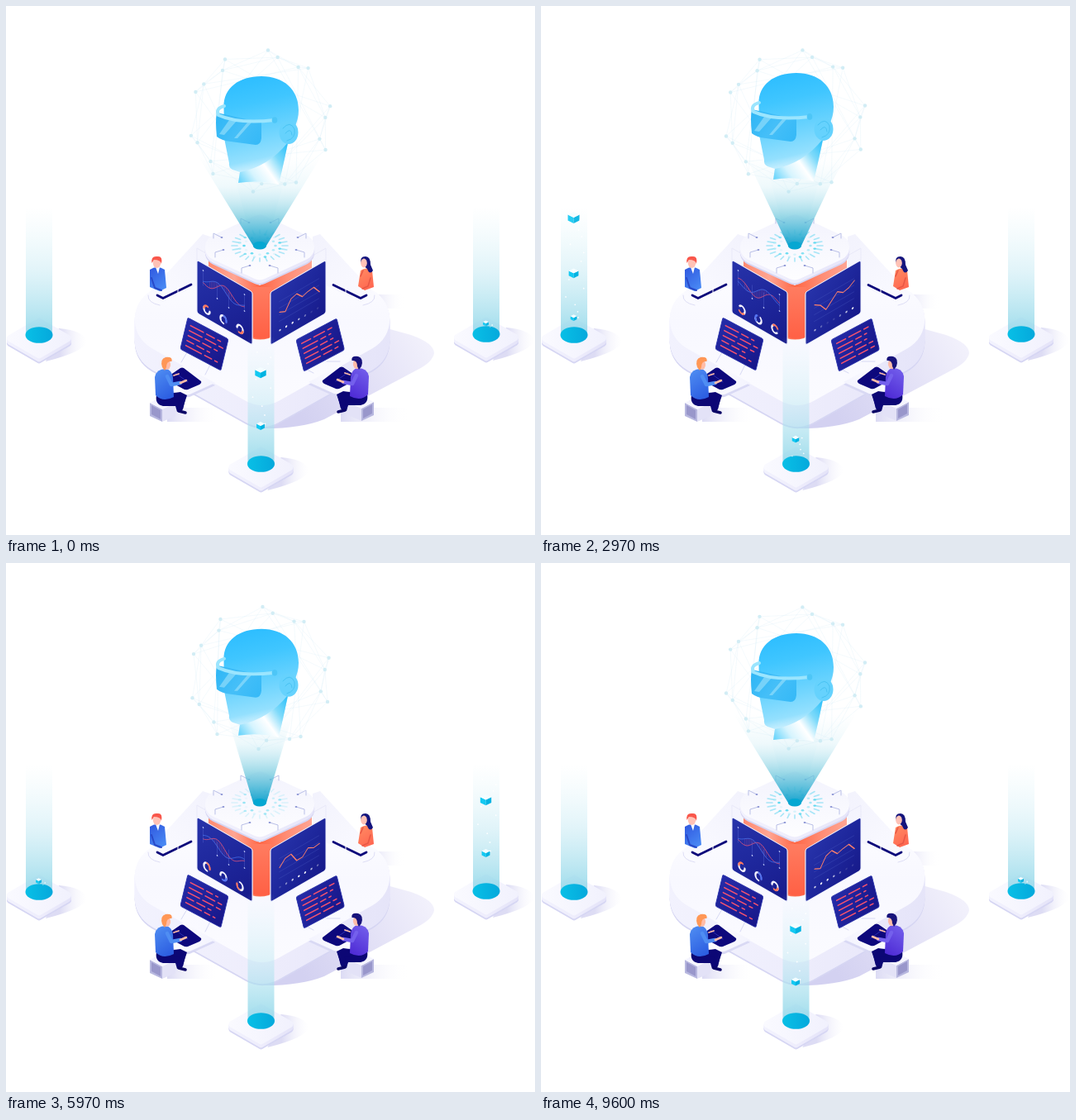
An HTML page with a canvas that plays this animation: 640x640 px, repeating every 9.63 s.

```html
<!DOCTYPE html>
<html lang="en">
<head>
<meta charset="utf-8">
<title>Virtual reality lab</title>
<style>
html, body { margin: 0; width: 100%; height: 100%; overflow: hidden; background: #fff; }
canvas { display: block; width: 640px; height: 640px; }
</style>
</head>
<body>
<canvas id="stage" width="640" height="640"></canvas>
<script>
const ctx = document.getElementById('stage').getContext('2d');
const LOOP = 9630, TAU = Math.PI * 2;
const { sin, cos, sqrt } = Math;
const clamp = v => Math.max(0, Math.min(1, v));
const mix = (a, b, k) => a + (b - a) * k;
const rand = n => { const v = sin(n * 127.1 + 11.7) * 43758.5453; return v - Math.floor(v); };
const turnAt = t => TAU * t / LOOP;

function grad(x0, y0, x1, y1, ...colors) {
  const g = ctx.createLinearGradient(x0, y0, x1, y1);
  colors.forEach((c, i) => g.addColorStop(i / (colors.length - 1), c));
  return g;
}
const fill = (d, paint) => { ctx.fillStyle = paint; ctx.fill(new Path2D(d)); };
function line(d, color, width = 1) {
  ctx.strokeStyle = color;
  ctx.lineWidth = width;
  ctx.lineCap = ctx.lineJoin = 'round';
  ctx.stroke(new Path2D(d));
}
function oval(x, y, rx, ry, paint) {
  ctx.fillStyle = paint;
  ctx.beginPath();
  ctx.ellipse(x, y, rx, ry, 0, 0, TAU);
  ctx.fill();
}
function inSpace(matrix, draw) {
  ctx.save();
  ctx.transform(...matrix);
  draw();
  ctx.restore();
}

function diamond(x, y, w, h, r, paint) {
  const p = [[x - w, y], [x, y + h], [x + w, y], [x, y - h]];
  ctx.beginPath();
  ctx.moveTo(x - w / 2, y - h / 2);
  p.forEach((q, i) => ctx.arcTo(...q, ...p[(i + 1) % 4], r));
  ctx.closePath();
  ctx.fillStyle = paint;
  ctx.fill();
}
function slab(x, y, w, h, r, depth, top) {
  const side = grad(x - w, 0, x + w, 0, '#f3f3fe', '#eeedfc', '#e3e2f8');
  for (let d = depth; d > 0; d--) diamond(x, y + d, w, h, r, d > depth - 2 ? '#d6d6f3' : side);
  diamond(x, y, w, h, r, top);
}

const PILLARS = [
  { x: 40, y: 398, start: -300 },
  { x: 581, y: 397, start: 3350 },
  { x: 308.5, y: 554, start: 7010 }
];

function pillarBase({ x, y }) {
  fill(`M${x + 8} ${y + 32}Q${x + 56} ${y + 20} ${x + 58} ${y + 7}Q${x + 52} ${y - 6} ${x + 24} ${y - 8}Z`,
    grad(x + 25, 0, x + 58, 0, '#dddcf4', '#f6f6fd00'));
  slab(x, y + 4, 43, 25, 4, 6, grad(x - 40, y, x + 40, y, '#fafaff', '#f1f1fd'));
}

function cube(x, y, s) {
  const h = s * .5;
  fill(`M${x - s} ${y - h}L${x} ${y}V${y + s}L${x - s} ${y + h}Z`, '#13c9f2');
  fill(`M${x + s} ${y - h}L${x} ${y}V${y + s}L${x + s} ${y + h}Z`, '#00b3e2');
  fill(`M${x - s} ${y - h}L${x} ${y - s}L${x + s} ${y - h}L${x} ${y}Z`, '#f4fdff');
}

function pillarBeam({ x, y, start }, t) {
  fill(`M${x - 16} ${y - 156}H${x + 16}V${y}A16.3 10 0 0 1 ${x - 16} ${y}Z`,
    grad(0, y - 154, 0, y, '#d8f2f800', '#c3e9f380', '#82d2e6c8'));
  oval(x, y, 16.5, 9.8, grad(x - 16, y, x + 16, y, '#08bfe6', '#05a9dc'));
  const age = delay => ((t - start - delay) % LOOP + LOOP) % LOOP;
  const fallen = u => (1 - cos(Math.PI * u)) / 2;
  for (const delay of [0, 1190, 2600]) {
    const u = age(delay) / 3900;
    if (u >= 1) continue;
    const p = fallen(u);
    ctx.globalAlpha = clamp((u - .08) / .1) * clamp((1 - u) / .06);
    cube(x - .5, y - 152 + 140 * p, 7 - 3.6 * p * p);
  }
  for (let i = 0; i < 14; i++) {
    const u = age(i * 200 + 150) / 3900;
    if (u >= 1) continue;
    ctx.globalAlpha = .9 * clamp(u * 5) * clamp((1 - u) * 8);
    oval(x - 12 + 24 * rand(i), y - 145 + 137 * fallen(u), .9, .9, '#fff');
  }
  ctx.globalAlpha = 1;
}

function platform() {
  fill('M450 387L490 398Q518 408 518 420Q516 431 498 440L385 500Q355 512 306 511Z',
    grad(360, 500, 515, 405, '#d3d1f1', '#e2e0f6', '#f3f2fc'));
  for (const [x, y, w] of [[195, 486, 62], [405, 486, 84], [440, 349, 42]])
    fill(`M${x} ${y}h${w}v17h${-w}Z`, grad(x, 0, x + w, 0, '#dcdbf4', '#ffffff00'));
  slab(310, 379, 196, 110, 40, 28, grad(0, 285, 0, 480, '#ffffff', '#f8f8ff', '#fbfbff'));
  const arm = () => {
    fill('M172 348Q169 356 184 361L247 330V279L238 276Z', grad(175, 350, 245, 285, '#fafaff', '#f3f3fd'));
    line('M172 350Q171 359 186 362', '#dedef5');
  };
  arm();
  inSpace([-1, 0, 0, 1, 618, 0], arm);
}

function backPeople() {
  fill('M174 319Q183 313 192 319L194 341L186 345L174 340Z', grad(174, 318, 194, 342, '#315ae0', '#4a8cf5'));
  fill('M181 316h5l-2 8Z', '#fff');
  oval(182.5, 311, 4.7, 6, '#ffc2b6');
  fill('M176.500 311Q175 302 183 303Q190 302 188 312Q187 307 179 307Z', '#f9574b');
  line('M176 329L180 341L188 344', '#2849c8', 2);
  fill('M429 320Q436 315 443 320L445 340L434 344L426 339Z', grad(428, 318, 444, 342, '#ff8a62', '#ff6550'));
  fill('M430 312Q427 303 435 303Q441 303 441 313L444 320Q440 326 437 318Z', '#14147d');
  oval(433, 311, 3.8, 5.4, '#ffc2b6');
  line('M429 327L432 320M441 329L438 339L431 342', '#e85745', 1.5);
  line('M183 350L190 353.500L224 337', '#0c087a', 2.8);
  line('M436 350L429 353.500L396 337.500', '#0c087a', 2.8);
  line('M208 340V349M411 340V349', '#fff', 1);
}

function tower() {
  fill('M245 301L307 338L370 301V365L318 402Q307 405 297 402L245 365Z',
    grad(245, 0, 370, 0, '#ff8a70', '#ffa593', '#ff6847', '#ff8c74', '#ffa593'));
  fill('M297 340h24v60q-12 5-24 0Z', grad(0, 340, 0, 402, '#ff7c60', '#ff6045'));
  line('M231 310V293L254 306M387 310V293L364 306', '#e9e9f9', 1);
  slab(307, 292, 88, 41, 16, 6, grad(0, 255, 0, 330, '#f3f3fd', '#fdfdff'));
}

function hooks() {
  const side = () => {
    for (const [x, y, drop] of [[251, 276, 4], [284, 258, 4], [253, 299, -4], [285, 318, -4]]) {
      line(`M${x} ${y + 5}V${y - 1}L${x + 10} ${y + drop}`, '#b9bfe7', 1);
      oval(x + 10, y + drop, 1.4, .9, '#8c95d5');
    }
  };
  side();
  inSpace([-1, 0, 0, 1, 614, 0], side);
}

function floorLights(t) {
  const beat = sin(turnAt(t) * 5);
  const rays = .65 * clamp(.95 - beat), dots = .7 * clamp(1 - .6 * beat);
  for (let i = 0; i < 24; i++) {
    const c = cos(TAU * i / 24), s = .56 * sin(TAU * i / 24);
    const r = i % 2 ? 25 : 19;
    ctx.globalAlpha = rays;
    line(`M${307 + 27 * c} ${290 + 27 * s}L${307 + 34 * c} ${290 + 34 * s}`, '#7ddcf2', 1.6);
    ctx.globalAlpha = dots * (.55 + .45 * sin(i * 1.7));
    oval(307 + r * c, 290 + r * s, 1.8, 1.2, '#20cde9');
  }
  ctx.globalAlpha = 1;
}

function projection(t) {
  const w = 6 + 54 * sqrt(clamp(.95 * (1 + cos(turnAt(t)))));
  const cone = (half, paint) => {
    const top = half + (half - 8) * .3;
    fill(`M${307 - top} 180H${307 + top}L315 290A8 4.500 0 0 1 299 290Z`, paint);
  };
  cone(31, grad(0, 195, 0, 290, '#d8f0f700', '#c8eaf450'));
  cone(w, grad(0, 182, 0, 292, '#d9f1f700', '#c3e9f348', '#6bc6dcb0', '#0c9fcc'));
  if (w < 30) {
    ctx.globalAlpha = (30 - w) / 30;
    cone(w, grad(0, 210, 0, 290, '#8bd5e800', '#3eb1d0', '#12a3cc'));
    ctx.globalAlpha = 1;
  }
  oval(307, 289.500, 8, 4.500, '#06a7d2');
}

function panel(x, y, slope, draw) {
  inSpace([1, slope, 0, 1, x, y], () => {
    const d = 'M2 0H64Q66 0 66 2V61Q66 63 64 63H2Q0 63 0 61V2Q0 0 2 0Z';
    line(d, '#eef0ff', 2.4);
    fill(d, grad(0, 0, 66, 63, '#2733aa', '#1e279c', '#171a8a'));
    draw();
  });
}

function wavePanel(t) {
  const a = turnAt(t);
  const wave = (x, k) => 20 + (3 + 5 * sin((x - 7) / 50 * Math.PI)) * sin(x / (7 + k) + k * 1.9 + a * 2);
  let hatch = '';
  for (let x = 15; x < 42; x += 2) hatch += `M${x} ${wave(x, 0)}V${wave(x, 1)}`;
  line(hatch, '#c0508a70', .5);
  ['#e2567c', '#4470ea'].forEach((color, k) => {
    let d = '';
    for (let x = 7; x <= 57; x += 2) d += `${d ? 'L' : 'M'}${x} ${wave(x, k)}`;
    line(d, color, .7);
  });
  line('M7 8V26M57 8V28M24 16V32M38 17V35', '#6a7be070', .6);
  for (const [x, y] of [[7, 8], [57, 8], [57, 28], [24, 32], [38, 35]]) oval(x, y, .8, .8, '#cdd6ff');
  for (let i = 0; i < 3; i++) {
    const turn = a * 2 + i * 1.6;
    const arc = (from, to, paint) => {
      ctx.beginPath();
      ctx.ellipse(11.500 + i * 20, 53, 3.6, 4.6, 0, from, to);
      ctx.strokeStyle = paint;
      ctx.lineWidth = 2.2;
      ctx.stroke();
    };
    arc(0, TAU, '#2c2f9f');
    arc(turn, turn + 3.8, '#f4f3ff');
    arc(turn + 3.3, turn + 5, i === 1 ? '#5474f2' : '#ff785f');
  }
}

function chartPanel(t) {
  const a = turnAt(t);
  for (let y = 17; y <= 41; y += 8) line(`M10 ${y}H58`, '#5361c570', .6);
  for (let i = 0; i < 7; i++) {
    ctx.globalAlpha = .55 + .45 * cos(a * 2 - i * .75 + 1);
    oval(11 + i * 7.6, 52, 1.2, 1.2, '#fff');
  }
  ctx.globalAlpha = 1;
  const points = Array.from({ length: 8 }, (_, i) =>
    `${10.5 + i * 6.9} ${26 + 5 * sin(i * 1.9 + a * 2) + 4 * cos(i * .9 - a)}`);
  line('M' + points.join('L'), '#ff8069', 1.1);
}

function codeScreen(x, y, slope, lean, seed, t) {
  line(seed ? 'M364 440L372 444M388 430L404 430' : 'M219 419L212 431M247 434L241 446', '#d7d9f4', 1);
  inSpace([1, slope, lean, 1, x, y], () => {
    const d = 'M2 0H47Q49 0 49 2V36Q49 38 47 38H2Q0 38 0 36V2Q0 0 2 0Z';
    fill(d, grad(0, 0, 49, 38, '#252ca9', '#171688'));
    line(d, '#2932ab', .8);
    for (let row = 0; row < 5; row++) {
      const top = 7 + row * 6, first = 7 + 12 * rand(row + seed);
      const rest = (38 - first) * (.75 + .25 * sin(turnAt(t) * 3 + row * 1.6 + seed));
      line(`M5 ${top}h${first}m4 0h${rest * .55}m4 0h${rest * .2}`, '#f4526e', 1.5);
    }
  });
}

function desk() {
  fill('M186 455L215 437L253 459L222 473Q210 475 199 466Z', '#d9d9f4');
  fill('M186 453L215 435L253 456L222 470Q210 472 199 464Z', grad(186, 440, 250, 468, '#ffffff', '#f3f3fe'));
  fill('M192 451L211 438Q213 437 215 438L236 454Q237 456 234 458L220 464Q217 465 214 463Z', '#0d087c');
  line('M205 444L220 455', '#2a2eb0', 1);
}

function sitter(hair, shirtDark, shirtLight) {
  fill('M174 480L189 488V503L174 496Z', '#b7b7df');
  fill('M189 488L205 480V496L189 503Z', '#e3e2f7');
  fill('M174 480L190 472L205 480L189 488Z', '#f5f5ff');
  fill('M176 483L187 489V500L176 494Z', '#9997cb');
  fill('M182 471Q180 482 190 484L205 484L207 491L213 489L219 471L211 467Z', '#0c0775');
  line('M205 473L214 473L211 486', '#0c0775', 7);
  line('M209 490L217 492', '#0a0565', 3.500);
  fill('M180 449Q182 439 193 439Q201 440 202 450L203 473Q190 480 181 471Z',
    grad(180, 441, 203, 476, shirtLight, shirtDark));
  line('M195 448L200 458L211 456', shirtLight, 4.5);
  line('M211 456L218 453', '#ffbca8', 2.600);
  line('M203 447L209 445', '#ffbca8', 1.8);
  oval(194.500, 434, 4.600, 6, '#ffbca8');
  fill('M189 437Q186 427 193 425Q202 424 200.500 430Q194 429 194 437L192 441Z', hair);
}

// Ten pairs of points on a swaying ring, joined by chords.
function network(t) {
  const a = turnAt(t), sway = 9 * sin(a) + 7 * sin(2 * a) + 3 * cos(a) - 3;
  const nodes = Array.from({ length: 20 }, (_, i) => {
    const pair = i >> 1, inner = i % 2;
    const angle = (pair * 36 + 6 + inner * (pair % 2 ? -7 : 9) + sway) * TAU / 360;
    const radius = inner ? 74 + 8 * rand(pair) : 86;
    return [308 + radius * sin(angle), 139 - radius * cos(angle)];
  });
  let web = '';
  nodes.forEach((n, i) => {
    for (const step of i % 2 ? [1, 2, 5] : [1, 3, 7]) web += `M${n}L${nodes[(i + step) % 20]}`;
  });
  line(web, '#c4e5f050', .6);
  nodes.forEach(([x, y]) => oval(x, y, 2.2, 2.2, '#d2edf5'));
}

function head(t) {
  inSpace([1, 0, 0, 1, 0, 3 * cos(turnAt(t)) - 3], () => {
    fill('M263.500 122C263 99 282 85 309 85C336 85 354 101 354 126C354 142 346 152 342 163L337 184L330 216Q304 211 281 214L283 201L274 198Q269 195 270 190L264 160Z',
      grad(288, 85, 318, 216, '#2cbdff', '#40c6ff', '#67d2fe', '#94e0fe', '#ffffff70'));
    fill('M281 214L283 201Q318 194 341 165L337 185L330 216Q305 210 281 214Z',
      grad(284, 213, 341, 172, '#70d6fb', '#d6f4fe', '#ffffff', '#7edafa', '#36c3fa'));
    oval(342, 153, 11.500, 14, '#66d2fd');
    line('M335 148Q344 138 349 149Q351 160 340 163M338 154Q345 146 346 156', '#49c3f3', 1);
    fill('M255 129Q253 139 255 158Q261 163 272 164L302 168Q308 168 309 160V141Z',
      grad(257, 130, 309, 166, '#2fb6f5', '#45bff8', '#35b9f7'));
    fill('M270 138L279 139L264 156L258 155ZM292 141L297 141L280 160L276 160Z', '#a4e4fc90');
    line('M264 121Q253 124 257 132Q281 143 325 138', '#9be5fe', 4);
    oval(325, 138, 3.300, 3.800, '#4dc6f7');
  });
}

function frame(now) {
  const t = now % LOOP;
  ctx.fillStyle = '#fff';
  ctx.fillRect(0, 0, 640, 640);
  platform();
  backPeople();
  tower();
  hooks();
  floorLights(t);
  panel(231.500, 308, .58, () => wavePanel(t));
  panel(320.500, 346.500, -.58, () => chartPanel(t));
  codeScreen(220, 377, .53, -.24, 0, t);
  codeScreen(351, 404, -.53, .25, 9, t);
  desk();
  sitter('#ff9756', '#2858df', '#4f8df2');
  inSpace([-1, 0, 0, 1, 619, -1], () => {
    desk();
    sitter('#17137b', '#4b27d3', '#7460ec');
  });
  PILLARS.forEach(pillarBase);
  PILLARS.forEach(p => pillarBeam(p, t));
  network(t);
  projection(t);
  head(t);
  requestAnimationFrame(() => frame(performance.now() - began));
}
const began = performance.now();
frame(0);
</script>
</body>
</html>
```
